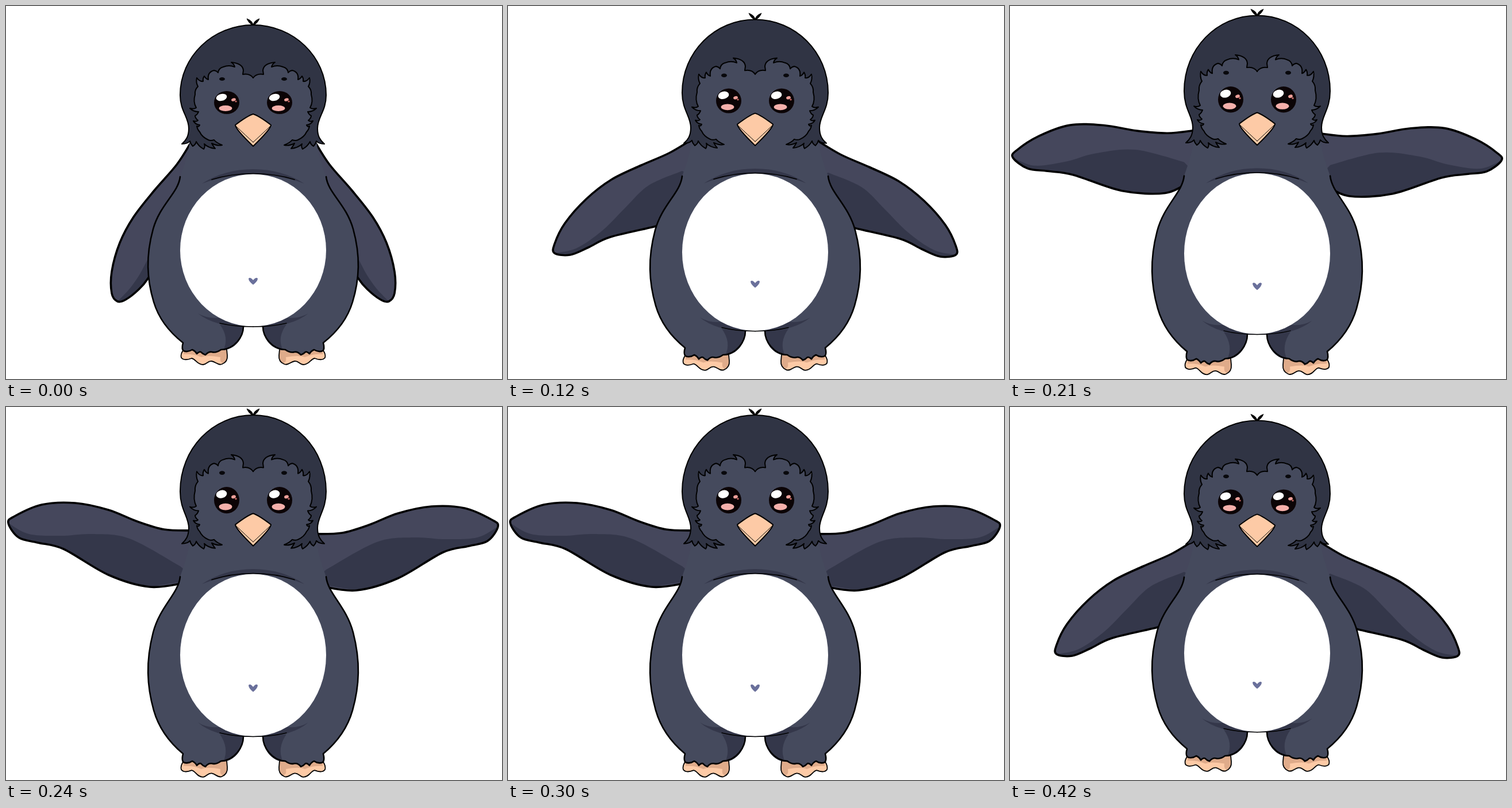
Recreate the animation shown at these times as an HTML page with a canvas. Size 863x649 px, loop 0.45 s.

```html
<!DOCTYPE html>
<html lang="en">
<head>
<meta charset="utf-8">
<title>Flapping penguin</title>
<style>
html, body { margin: 0; width: 100%; height: 100%; overflow: hidden; background: #fff; }
canvas { display: block; }
</style>
</head>
<body>
<canvas id="stage" width="863" height="649"></canvas>
<script>
const ctx = document.getElementById('stage').getContext('2d');
ctx.lineJoin = ctx.lineCap = 'round';

const STEP = 30, STEPS = 15, PEAK = 9, AXIS = 860;
const BODY = '#454a5d', HEAD = '#303444', DARK = '#34374a', WING = '#45475c', SKIN = '#fdcaa6';

// Left wing at four poses: upper edge from the neck, tip, underside.
const WING_TIMES = [0, 4, 6, 8];
const WING_EDGE = [
  [322,237, 297,276, 258,321, 222,367, 198,412, 184,462, 184,500, 194,514, 208,511, 230,494, 247,474, 275,425, 300,370],
  [322,231, 280,256, 232,277, 180,302, 136,336, 99,378, 81,414, 81,430, 108,433, 140,420, 178,402, 258,383, 290,372],
  [322,220, 275,232, 220,237, 160,239, 104,251, 56,281, 25,310, 21,324, 50,337, 85,336, 128,335, 215,346, 282,341],
  [322,215, 275,213, 228,199, 178,179, 120,167, 62,170, 15,190, 4,202, 22,227, 55,236, 100,247, 178,292, 250,313]
];
const WING_SHADE = [
  [215,492, 232,468, 247,440, 275,390, 305,300],
  [120,421, 165,390, 205,350, 245,312, 303,287],
  [60,331, 115,314, 160,290, 225,271, 303,273],
  [40,221, 95,224, 150,221, 215,229, 303,277]
];

// How far each height has moved when the body is fully stretched.
const STRETCH = [[0,-19], [33,-19], [120,-13.5], [190,-2.5], [293,-2], [650,21.5]];

const HEAD_EDGE = 'M430,33 C360,33 303,88 303,155 C303,183 318,193 318,213 C318,227 313,234 306,240 ' +
  'Q316,240 320,235 Q321,240 325,244 Q330,241 331,236 Q335,244 344,249 Q347,244 345,240 ' +
  'Q352,247 364,248 Q360,243 358,239 Q368,244 376,242 Q366,238 362,233 Q356,235 352,233 ' +
  'Q341,228 337,219 Q333,215 332,209 Q336,211 337,207 Q329,206 326,200 Q331,202 334,199 ' +
  'Q329,195 329,191 Q333,189 335,184 Q326,184 320,178 Q327,180 331,177 Q325,167 329,154 ' +
  'Q328,146 334,140 Q330,133 332,125 Q337,132 343,131 Q342,126 345,122 Q348,127 352,128 ' +
  'Q350,115 362,112 Q367,113 369,116 Q370,108 378,106 Q388,102 398,106 Q397,101 392,98 ' +
  'Q412,100 413,112 L412,119 Q424,117 430,125';
const LEG_EDGE = 'M303,297 C300,325 268,345 256,388 C243,435 245,475 257,515 C266,545 285,568 308,586 ' +
  'Q305,597 309,600 Q316,603 324,598 Q329,600 332,605 Q336,601 339,602 Q343,606 347,607 ' +
  'Q352,601 358,602 Q366,604 374,598 C398,597 413,575 413,558';
const FOOT = 'M309,598 Q303,606 305,612 Q310,618 323,613 C330,614 332,624 343,624 ' +
  'C350,623 351,617 358,618 C365,619 369,626 376,623 Q386,619 385,608 L384,597 Z';

let stretch = 0;

function warp(y) {
  const i = STRETCH.findIndex(([at]) => at >= y), [y0, d0] = STRETCH[i - 1], [y1, d1] = STRETCH[i];
  return y + stretch * (d0 + (d1 - d0) * (y - y0) / (y1 - y0));
}

function paint(path, fill, width) {
  if (fill) { ctx.fillStyle = fill; ctx.fill(path); }
  if (width) { ctx.lineWidth = width; ctx.stroke(path); }
}

function draw(d, fill, width, flip) {
  const place = (_, x, y) => `${flip ? AXIS - x : x},${warp(+y)}`;
  paint(new Path2D(d.replace(/([\d.]+),([\d.]+)/g, place)), fill, width);
}

function both(d, fill, width) {
  draw(d, fill, width, false);
  draw(d, fill, width, true);
}

function oval(x, y, rx, ry, fill, tilt = 0) {
  const top = warp(y - ry), bottom = warp(y + ry);
  const path = new Path2D();
  path.ellipse(x, (top + bottom) / 2, rx, (bottom - top) / 2, tilt, 0, 7);
  paint(path, fill);
}

// Cubic blend through the four wing poses.
function blend(poses, time) {
  const weights = WING_TIMES.map(a => WING_TIMES.reduce((w, b) => a === b ? w : w * (time - b) / (a - b), 1));
  const points = [];
  for (let i = 0; i < poses[0].length; i += 2) {
    points.push([0, 1].map(k => poses.reduce((sum, pose, n) => sum + weights[n] * pose[i + k], 0)));
  }
  return points;
}

function spline(points) {
  let d = 'M' + points[0];
  for (let i = 0; i < points.length - 1; i++) {
    const b = points[i], c = points[i + 1], a = points[i - 1] || b, e = points[i + 2] || c;
    const near = b.map((v, k) => v + (c[k] - a[k]) / 6);
    const far = c.map((v, k) => v - (e[k] - b[k]) / 6);
    d += `C${near} ${far} ${c}`;
  }
  return d;
}

function drawWing(pose, flip) {
  const place = ([x, y]) => flip ? [AXIS - x, y + 0.75 * pose] : [x, y];
  const edge = blend(WING_EDGE, pose).map(place), shade = blend(WING_SHADE, pose).map(place);
  const inner = place([330, 300]);
  const outline = spline([...edge, place([312, 306])]);
  paint(new Path2D(`${outline}L${inner}Z`), WING);
  const under = spline(edge.slice(7).reverse()).replace('M', 'L');
  paint(new Path2D(`${spline([edge[7], ...shade])}L${inner}${under}Z`), DARK);
  paint(new Path2D(outline), null, 3.6);
}

function drawBody() {
  both(FOOT, SKIN);
  both('M309,598 L384,597 Q387,612 380,621 Q371,622 373,611 Q350,607 340,611 Q325,605 309,606 Z', '#dfab8a');
  both(FOOT, null, 1.8);
  both('M430,90 C345,90 322,120 322,180 C322,215 325,238 303,297' + LEG_EDGE.slice(8) + ' L430,558 Z', BODY);
  both('M413,558 C413,580 398,597 378,599 Q389,577 372,554 Z', DARK);
  both('M334,535 Q352,545 372,542 L413,558 Q362,557 334,535 Z', DARK);
  both(LEG_EDGE, null, 2.6);
  both('M341,309 Q380,284 430,284 L430,293 Q380,294 341,309 Z', DARK);
  oval(430, 425, 127, 132.5, '#fff');
  both('M358,302 Q392,291.5 430,291.5', null, 1.6);
  both('M372,552 Q398,558 430,558', null, 1.4);
  draw('M422,474 Q425,471 430,477 Q435,471 438,474 Q438,479 430,485 Q422,479 422,474 Z', '#6a709b');
}

function drawEye(x) {
  oval(x, 168, 22, 20, '#0b0406');
  oval(x - 9, 159, 9.5, 6, '#fff', -0.25);
  oval(x + 12, 163, 4, 2.5, '#f0a09a', -0.3);
  oval(x + 16, 166, 1.8, 1.5, '#b5605c');
  oval(x - 2, 178, 11.5, 5, '#f5b0ab');
}

function drawHead() {
  both('M430,34 Q430,26 419,22 Q422,30 430,34 Z', '#000', 0.8);
  both(HEAD_EDGE, HEAD);
  both(HEAD_EDGE, null, 2);
  for (const x of [376, 484]) oval(x, 127, 5, 3, '#08080c');
  drawEye(384);
  drawEye(476);
  draw('M430,188 Q440,191 461,207 Q461,214 430,244 Q399,214 399,207 Q420,191 430,188 Z', SKIN, 2);
  both('M400,209 Q418,226 430,237', null, 1);
}

function render(pose) {
  stretch = pose / 8;
  ctx.fillStyle = '#fff';
  ctx.fillRect(0, 0, 863, 649);
  ctx.strokeStyle = '#000';
  drawWing(pose, false);
  drawWing(pose, true);
  drawBody();
  drawHead();
}

let shown = -1;
function tick() {
  const step = Math.floor(performance.now() / STEP) % STEPS;
  if (step !== shown) {
    shown = step;
    render(step <= PEAK ? step : 2 * PEAK - step);
  }
  requestAnimationFrame(tick);
}
tick();
</script>
</body>
</html>
```
